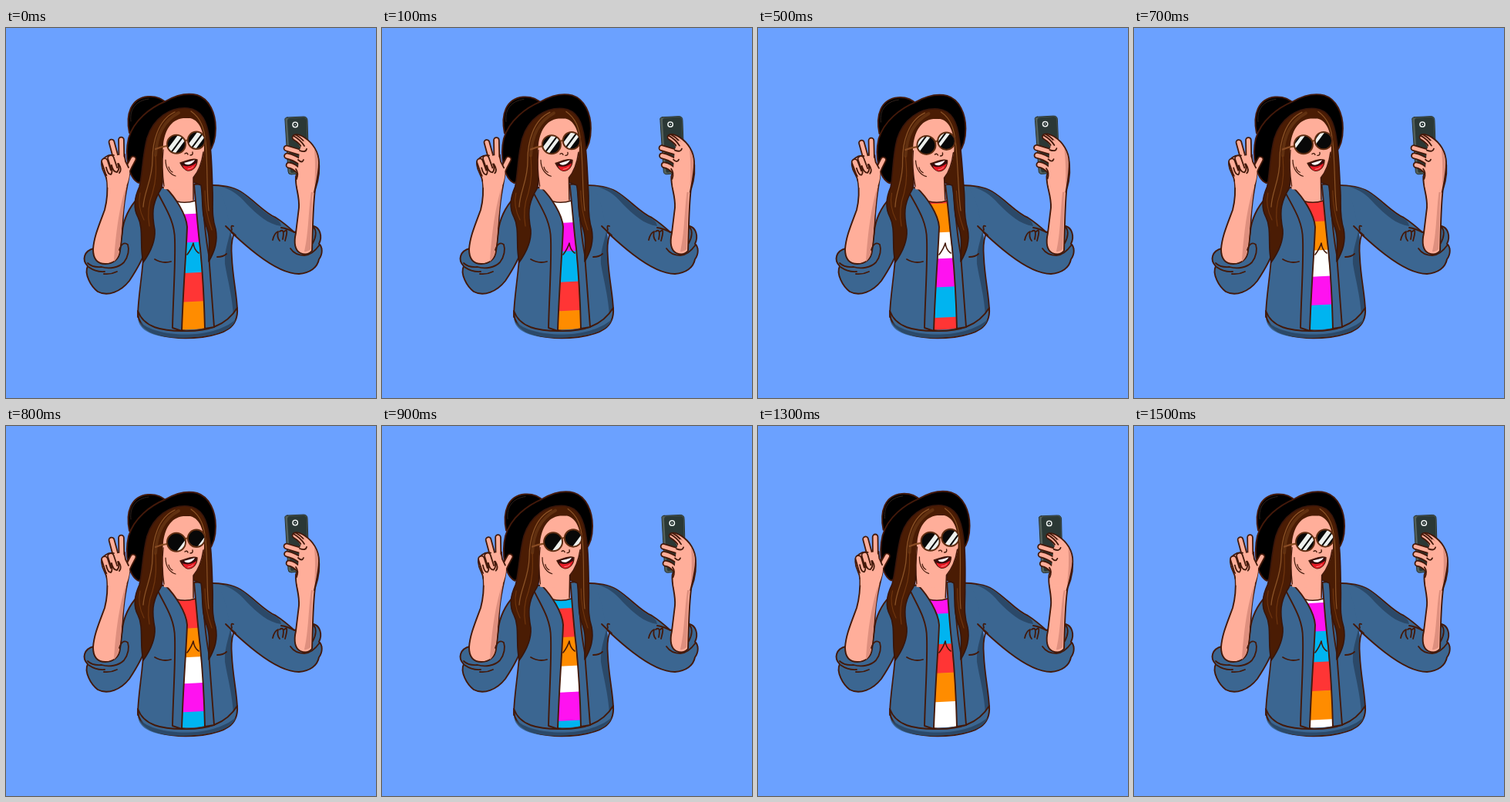
Animation of 480 by 480 pixels, one loop 1.6 s. Source, as an HTML page with a canvas:

```html
<!DOCTYPE html>
<html lang="en">
<head>
<meta charset="utf-8">
<style>
  html, body { margin: 0; width: 100%; height: 100%; overflow: hidden; background: #6ba1ff; }
  canvas { display: block; width: 100%; height: 100%; }
</style>
</head>
<body>
<canvas id="stage" width="480" height="480"></canvas>
<script>
const ctx = document.getElementById('stage').getContext('2d');
const LOOP = 1600, STEP = 100;
const INK = '#43190a', SKIN = '#ffae9a', SKIN_SHADE = '#de8f7e';
const DENIM = '#3b6691', DENIM_DARK = '#2b4969', HAIR = '#4a1c04', GLOW = '#8a5226';
const STRIPES = [['#ffffff', 34], ['#ff12f0', 37], ['#00b4f0', 39.6], ['#ff3535', 37.5], ['#ff8c00', 37.5]];
const STRIPE_CYCLE = STRIPES.reduce((sum, stripe) => sum + stripe[1], 0);

let sway = 0;
const clamp = (v, lo, hi) => Math.min(hi, Math.max(lo, v));

// The upper part of the figure leans, fading to nothing at the chest.
function lean(x, y) {
  const k = clamp((235 - y) / 75, 0, 1);
  const w = sway * k * k * (3 - 2 * k);
  return [x - 2.8 * w, y + w * clamp((310 - x) / 65, -1, 1.2)];
}

function path(d) {
  return new Path2D(d.replace(/([\d.]+),([\d.]+)/g, (_, x, y) => lean(+x, +y).join(',')));
}

function shape(d, fill, stroke = INK, width = 1.9) {
  const p = path(d);
  if (fill) { ctx.fillStyle = fill; ctx.fill(p); }
  if (stroke) { ctx.strokeStyle = stroke; ctx.lineWidth = width; ctx.stroke(p); }
}

const line = (d, color = INK, width = 1.8) => shape(d, null, color, width);

function finger(d, width) {
  line(d, INK, width + 3.6);
  line(d, SKIN, width);
}

function disc(x, y, r, fill, stroke, width) {
  ctx.beginPath();
  ctx.arc(...lean(x, y), r, 0, Math.PI * 2);
  if (fill) { ctx.fillStyle = fill; ctx.fill(); }
  if (stroke) { ctx.strokeStyle = stroke; ctx.lineWidth = width; ctx.stroke(); }
}

function hat() {
  shape('M160,136 C155,112 162,91 184,89 C196,88 203,92 209,98 L200,130 Z', '#000');
  shape('M172,201 C158,194 154,165 159,143 C166,119 188,103 207,95 C221,87 236,84 248,87 C264,92 272,111 272,130 C272,144 269,154 263,161 L230,130 L190,190 Z', '#000');
  line('M162,121 C160,105 169,94 185,92', '#30221c', 1);
}

function neck() {
  shape('M201,180 L243,180 L244,228 L222,229 L204,209 Z', SKIN, null);
}

function shirt(progress) {
  const body = 'M216,223 Q233,229 250,223 L255,262 L259,320 L261,394 L224,395 L226,320 L229,262 Z';
  ctx.save();
  ctx.clip(path(body));
  ctx.transform(1, -0.05, 0, 1, 0, 12);
  let y = 207 - STRIPE_CYCLE + progress * STRIPE_CYCLE;
  for (let n = 0; n < 2 * STRIPES.length; n++) {
    const [color, height] = STRIPES[n % STRIPES.length];
    ctx.fillStyle = color;
    ctx.fillRect(210, y, 65, height + 0.5);
    y += height;
  }
  ctx.restore();
  line('M222,225 Q233,228 246,224', INK, 1.5);
  line('M229,392 Q245,393 258,390', INK, 1.5);
  line('M235,294 Q241,286 243,279 Q244,288 250,292', INK, 1.6);
}

function leftSleeve() {
  shape('M171,221 C160,232 152,249 151,264 L147,288 L114,286 C101,289 98,301 106,309 C101,319 110,335 119,342 C132,349 149,342 160,328 C170,313 178,299 182,285 L186,230 Z', DENIM);
}

function leftForearm() {
  shape('M131,195 C132,208 132,221 128,236 C121,255 114,271 113,287 C113,300 119,306 129,306 C139,306 147,300 148,289 C152,264 151,247 153,232 C155,213 158,203 160,190 Z', SKIN);
  shape('M157,203 C152,230 151,255 147,289 Q145,299 140,303 C142,270 147,228 157,203 Z', SKIN_SHADE, null);
  line('M147,288 C149,281 153,277 158,281 C160,287 159,296 153,304 C146,311 134,313 124,310 Q112,311 106,305');
  line('M107,310 Q117,317 128,316 M127,319 Q136,320 144,316');
}

function peaceHand() {
  finger('M150,172 L149.5,145', 5);
  finger('M143,170 L137,148', 5);
  finger('M156,188 Q160,179 165,170', 5);
  shape('M143,166 C148,163 154,165 155,173 L158,179 C162,185 160,195 157,203 C148,208 137,207 131,199 C131,190 124,186 124,176 C123,169 131,165 136,169 Z', SKIN, null);
  line('M140,165 C132,163 123,170 124,177 C125,188 130,189 131,199 M159,181 L155,173 Q154,168 154,164');
  finger('M128,173 L133,188', 6);
  finger('M136,169 L141,184', 6);
  shape('M131,187 L147,181 L157,188 L156,207 L132,207 Z', SKIN, null);
  line('M130,181 Q132,190 136,190 Q139,187 136,179 M137,178 Q139,187 144,187 Q148,183 145,176 M146,176 Q151,184 147,188');
}

function rightSleeve() {
  shape('M254,204 C276,203 292,205 304,212 C322,223 335,240 350,246 Q361,253 374,265 L399,257 C407,259 411,270 406,280 C411,284 411,293 406,300 C404,311 394,318 380,319 C363,319 343,307 326,294 C309,281 299,271 289,262 L264,250 Z', DENIM);
  shape('M280,206 C293,206 302,210 313,219 C326,230 337,242 350,247 Q356,251 357,257 C340,255 326,242 312,228 C301,215 292,210 280,206 Z', DENIM_DARK, null);
}

function torso() {
  shape('M198,208 C183,213 180,239 179,275 C179,324 171,349 171,375 C171,394 195,401 218,402 L228,394 L231,330 L235,264 C233,246 222,224 207,207 Z', DENIM, null);
  shape('M245,205 L272,206 C283,214 288,241 290,262 C295,270 292,279 293,298 C294,323 300,349 300,366 C300,390 282,399 245,402 L216,402 L227,392 L258,390 L255,326 L249,262 Z', DENIM, null);
  shape('M291,264 C294,272 292,283 293,298 C294,323 300,349 300,366 L295,375 C294,349 287,325 284,306 C283,290 288,278 291,264 Z', DENIM_DARK, null);
  shape('M171,367 C179,389 203,393 229,393 C262,394 286,386 300,363 C302,389 283,397 255,401 C218,405 170,400 171,367 Z', DENIM);
  shape('M174,381 C191,401 267,406 298,378 C292,397 257,401 230,402 C203,402 180,397 174,381 Z', DENIM_DARK, null);
  line('M179,285 C177,324 171,349 171,375 M295,269 C292,278 292,287 293,298 C294,323 300,349 300,366');
  shape('M195,210 Q200,206 207,207 C220,220 234,242 235,258 C234,289 230,333 228,393 L216,389 C217,345 220,306 219,275 C219,249 205,231 195,210 Z', DENIM);
  shape('M244,203 L254,202 C256,235 257,263 263,294 C266,331 268,365 270,388 L258,390 C257,348 255,317 252,286 C249,263 247,234 244,203 Z', DENIM);
  line('M193,300 Q203,306 214,303 M274,297 Q282,297 286,293');
  line('M285,257 Q291,263 298,269 M293,262 Q291,255 295,257');
}

function rightForearm() {
  shape('M376,193 C375,207 381,217 380,233 L376,266 C373,279 375,289 382,292 Q391,296 397,289 C398,262 398,232 401,210 C406,196 408,184 405,169 L386,160 Z', SKIN);
  shape('M404,177 C406,188 397,207 397,229 L395,287 Q391,291 387,290 C394,260 392,222 399,198 Z', SKIN_SHADE, null);
  line('M346,275 Q348,266 353,264 Q351,271 355,276 M355,264 Q362,259 359,274 M361,264 Q367,258 362,276 M374,265 Q365,260 357,259');
  line('M369,286 Q375,295 387,295 Q397,295 407,281 M399,258 Q405,266 398,279');
}

function phone() {
  shape('M365,116 L386,115 Q391,115 391,120 L393,184 Q393,188 389,188 L370,190 Q366,190 366,186 L362,120 Q361,116 365,116 Z', '#53605b', '#26302d', 1);
  shape('M368,117 L386,116 Q390,116 390,120 L392,184 L371,188 Q369,188 369,184 L365,121 Q365,117 368,117 Z', '#2b3835', null);
  disc(375.2, 125.5, 3.2, '#111c1b', '#eef3f1', 1.5);
  disc(375.2, 125.5, 1, '#b8c6c5');
}

function phoneHand() {
  const palm = 'M373,140 C376,136 382,139 387,142 C398,149 406,161 406,175 C406,187 403,199 400,213';
  shape(palm + ' L380,213 C375,200 379,190 380,183 L386,161 Z', SKIN, null);
  shape('M400,157 C406,167 407,182 400,205 Q402,180 400,157 Z', SKIN_SHADE, null);
  line(palm);
  finger('M375,142 Q384,147 389,157', 5);
  finger('M364,156 L384,162', 5);
  finger('M364.5,166 Q374,168 382,174', 5);
  finger('M367,178 Q374,179 380,186', 5);
  shape('M386,146 C396,152 400,167 399,184 L396,207 L381,207 C377,198 379,188 379,181 L381,158 Z', SKIN, null);
  line('M373,140 Q382,145 387,153 M381,159 Q389,162 390,157 M379,171 Q384,176 386,171 M376,183 Q380,188 377,196');
}

function hair() {
  shape('M236,104 C213,102 191,117 183,143 C177,165 177,189 173,206 C167,219 164,232 171,245 C179,261 173,283 178,304 C188,290 194,277 193,262 C189,241 190,229 198,214 Q204,206 203,195 L206,150 L237,117 L246,150 L243,200 L253,204 C256,221 253,240 259,255 C266,271 263,287 263,303 C271,289 275,277 272,261 C266,242 269,229 268,211 C267,183 267,165 264,145 C261,121 254,106 236,104 Z', HAIR, '#38150a', 1.6);
  line('M224,110 C203,121 195,142 194,165', '#613010', 4);
  line('M219,109 C197,119 190,148 190,171 C190,197 179,212 178,232', GLOW, 1.3);
  line('M194,165 C195,184 195,198 190,214 Q182,235 186,257', '#70360f', 1.2);
  line('M240,108 C253,117 257,130 259,148 C262,181 260,213 263,237', GLOW, 1.2);
  line('M174,214 Q170,231 179,249 M258,211 Q258,237 267,262', '#70360f', 1.1);
}

function lens(x, y, r, slide) {
  const [cx, cy] = lean(x, y);
  ctx.save();
  ctx.translate(cx, cy);
  ctx.beginPath();
  ctx.arc(0, 0, r, 0, Math.PI * 2);
  ctx.fillStyle = '#080808';
  ctx.fill();
  ctx.clip();
  ctx.rotate(0.64);
  ctx.fillStyle = '#edf0ed';
  for (const [at, width] of [[-5.5, 5.5], [2, 4]]) ctx.fillRect(at + slide, -20, width, 40);
  ctx.restore();
  disc(x, y, r, null, '#5e2d12', 2);
}

function face(slide) {
  shape('M230,117 C213,119 206,134 204,151 C202,170 203,188 205,209 L243,211 L243,194 C250,187 255,173 257,158 C258,140 253,120 239,117 Z', SKIN, null);
  line('M243,223 L243,194 C249,187 254,175 256,161', INK, 1.5);
  line('M204,158 C202,178 203,191 205,205', INK, 1.3);
  line('M207,171 C207,183 213,190 220,192 M211,180 Q212,185 216,187', INK, 1.2);
  line('M232,163 Q235,161 236,164 M239,165 Q243,165 242,161', INK, 1.4);

  shape('M226,175 C232,174 240,168 248,171 C248,179 243,185 236,185 C231,184 228,179 226,175 Z', '#360b0b', INK, 1.4);
  shape('M229,178 C235,181 242,179 247,175 C246,181 242,185 236,185 Q231,184 229,178 Z', '#e71925', null);
  shape('M231,175 Q239,173 245,171 Q243,175 238,177 Q233,178 231,175 Z', '#fff', null);
  line('M236,183 Q240,183 243,180', '#ff8b86', 1);

  line('M194,157 Q201,154 209,153 M232,147 Q234,145 236,146', '#884b23', 2.2);
  lens(221, 150.8, 12, slide);
  lens(247, 145.8, 11.2, slide);
}

function draw(now) {
  const t = Math.floor((now % LOOP) / STEP) * STEP;
  const progress = t / LOOP;
  const slide = 13 * (1 - 2 * ((progress + 0.5) % 1));
  sway = Math.sin(progress * Math.PI * 2);

  ctx.fillStyle = '#6ba1ff';
  ctx.fillRect(0, 0, 480, 480);
  ctx.lineCap = ctx.lineJoin = 'round';
  hat();
  neck();
  leftSleeve();
  leftForearm();
  peaceHand();
  rightSleeve();
  shirt(progress);
  torso();
  rightForearm();
  phone();
  phoneHand();
  hair();
  face(slide);
}

const start = performance.now();
function tick() {
  draw(performance.now() - start);
  requestAnimationFrame(tick);
}
tick();
</script>
</body>
</html>
```
